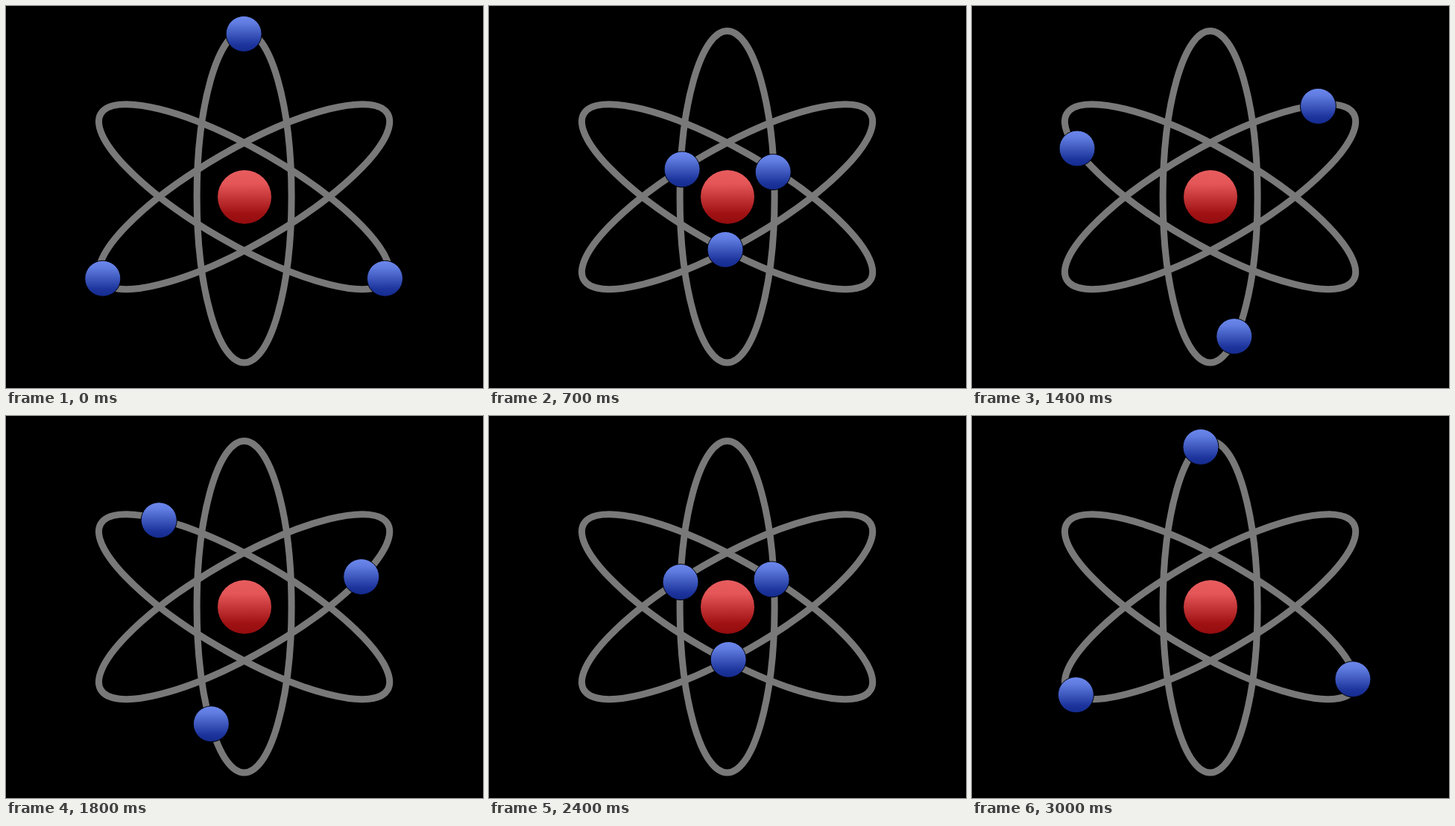
Animation of 640 by 512 pixels, one loop 3.1 s. Source, as an HTML page:

```html
<!DOCTYPE html>
<html lang="en">
<head>
<meta charset="utf-8">
<title>Atom</title>
<style>
  html, body { margin: 0; width: 100%; height: 100%; overflow: hidden; background: #000; }
  svg { display: block; width: 100vw; height: 100vh; }
  .ring { fill: none; stroke: #797979; stroke-width: 9; }
  .electron { fill: url(#blue); stroke: #000; }
</style>
</head>
<body>
<svg viewBox="0 0 640 512">
  <defs>
    <linearGradient id="red" x2="0" y2="1">
      <stop offset="0" stop-color="#e85c5e"/>
      <stop offset=".25" stop-color="#e45658"/>
      <stop offset=".8" stop-color="#a01214"/>
      <stop offset="1" stop-color="#940c0e"/>
    </linearGradient>
    <linearGradient id="blue" x2="0" y2="1">
      <stop offset="0" stop-color="#6c88ee"/>
      <stop offset=".2" stop-color="#607ce0"/>
      <stop offset=".8" stop-color="#1c349c"/>
      <stop offset="1" stop-color="#142a8e"/>
    </linearGradient>
    <path id="orbit" d="M0-218.6A62.8 218.6 0 0 1 0 218.6A62.8 218.6 0 0 1 0-218.6"/>
  </defs>
  <g id="rings" transform="translate(319.6 255.7)"/>
  <circle cx="320" cy="256" r="36" fill="url(#red)"/>
  <g id="electrons" transform="translate(319.1 256)"/>
</svg>
<script>
const STEP = 100, STEPS = 31, GAP = 13;
const orbit = document.getElementById('orbit');
const orbitLength = orbit.getTotalLength();

function add(parent, tag, attributes) {
  const node = document.createElementNS('http://www.w3.org/2000/svg', tag);
  for (const name in attributes) node.setAttribute(name, attributes[name]);
  return document.getElementById(parent).appendChild(node);
}

const tilts = [0, 120, 240];
tilts.forEach(tilt => add('rings', 'ellipse', { class: 'ring', rx: 63.5, ry: 222.3, transform: `rotate(${tilt})` }));
const electrons = tilts.map(() => add('electrons', 'circle', { class: 'electron', r: 24 }));

// Rest at the tip for one step, then run at constant speed around the open orbit.
function distance(step) {
  return step && GAP + (step - 1) * (orbitLength - 2 * GAP) / (STEPS - 2);
}

function draw(now) {
  const p = orbit.getPointAtLength(distance(Math.floor(now / STEP) % STEPS));
  electrons.forEach((electron, i) => {
    const a = tilts[i] * Math.PI / 180;
    electron.setAttribute('cx', p.x * Math.cos(a) - p.y * Math.sin(a));
    electron.setAttribute('cy', p.x * Math.sin(a) + p.y * Math.cos(a));
  });
}

const start = performance.now();
function tick() {
  draw(performance.now() - start);
  requestAnimationFrame(tick);
}
tick();
</script>
</body>
</html>
```
